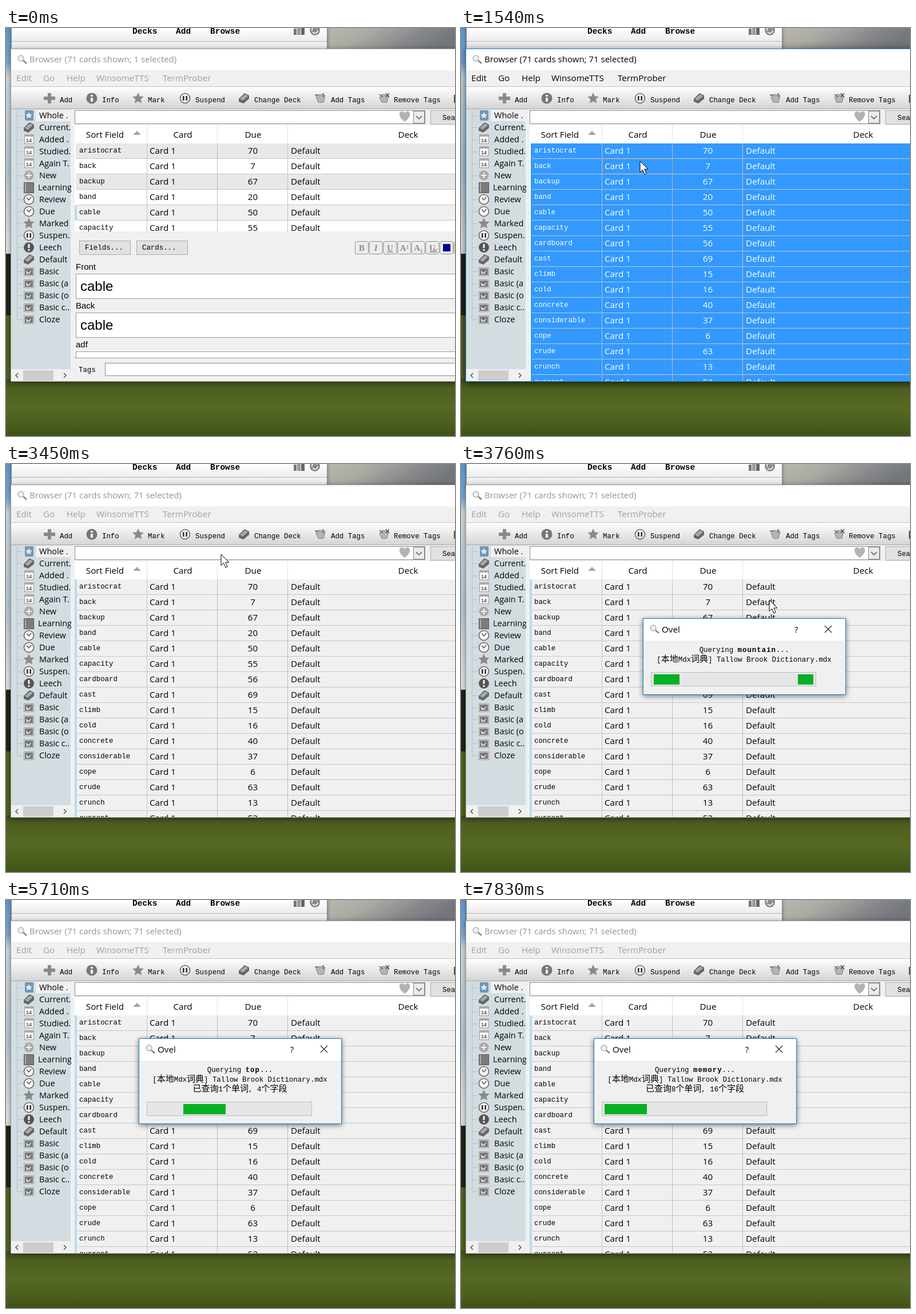
An HTML page for the animation above (8 s loop, 785 by 714 pixels).

```html
<!DOCTYPE html>
<html lang="en">
<head>
<meta charset="utf-8">
<title>Card browser</title>
<style>
html, body { margin: 0; width: 100%; height: 100%; overflow: hidden; background: #4d5f20; }
#stage { display: block; width: 785px; height: 714px; }
text { white-space: pre; fill: #000; }
.ui { font: 15.2px "Open Sans", "Noto Sans", sans-serif; }
.side { font: 14.5px "Open Sans", "Noto Sans", sans-serif; }
.title { font: 15px "Open Sans", "Noto Sans", sans-serif; }
.mono { font: 12.4px "Liberation Mono", "DejaVu Sans Mono", monospace; }
.head { font: bold 14.5px "Liberation Mono", "DejaVu Sans Mono", monospace; }
.label { font: 15px "Liberation Sans", sans-serif; }
.big { font: 24px "Liberation Sans", sans-serif; }
.fmt { font: bold 15px "Liberation Serif", serif; fill: #8b8b8b; text-anchor: middle; }
.date { font: bold 9px "Liberation Sans", sans-serif; fill: #555; text-anchor: middle; }
.cjk { font: 15px "Noto Sans CJK SC", "Noto Sans CJK", sans-serif; }
.word { font-weight: bold; letter-spacing: 1px; }
.mid { text-anchor: middle; }
.ico { fill: #8a8a8a; }
.pale { fill: #f4f4f4; }
.line { fill: none; stroke: #555; stroke-width: 1.5; }

.frame { fill: #f0f0f0; stroke: #9a9a9a; filter: drop-shadow(0 1px 4px #0006); }
.title { fill: #949494; }
.menu text { fill: #9aa39e; }
[data-active] .frame { stroke: #2684cf; filter: drop-shadow(0 2px 7px #0009); }
[data-active] .title { fill: #000; }
[data-menu] .menu text { fill: #000; }

.row > rect { fill: #fff; }
.row.even > rect { fill: #e8e8e8; }
.row .strip, .focus { visibility: hidden; }
.row .strip { fill: #b9dcf3; }
[data-mode=idle] .r4 > rect, [data-mode=dim] .row > rect { fill: #f0f0f0; }
[data-mode=idle] .r4 .strip, [data-mode=dim] .row .strip { fill: #b9dcf3; visibility: visible; }
[data-mode=one] .r1 > rect, [data-mode=all] .row > rect { fill: #39f; }
[data-mode=one] .r1 text, [data-mode=all] .row text { fill: #fff; }
[data-mode=one] .focus, [data-mode=all] .focus { visibility: visible; }
.focus { fill: none; stroke: #c98f4e; stroke-dasharray: 1 1; }
</style>
</head>
<body>
<svg id="stage" viewBox="0 0 785 714"></svg>
<script>
const LOOP = 8000, TICK = 75;

const rect = (x, y, w, h, fill, more = '') =>
  `<rect x="${x}" y="${y}" width="${w}" height="${h}" fill="${fill}" ${more}/>`;
const box = (x, y, w, h, fill, stroke, more = '') =>
  rect(x + .5, y + .5, w - 1, h - 1, fill, `stroke="${stroke}" ${more}`);
const text = (x, y, s, cls, more = '') => `<text x="${x}" y="${y}" class="${cls}" ${more}>${s}</text>`;
const path = (d, more = 'class="ico"') => `<path d="${d}" ${more}/>`;
const at = (x, y, s) => `<g transform="translate(${x} ${y})">${s}</g>`;
const pane = (x, y, w, h, s) => `<svg x="${x}" y="${y}" width="${w}" height="${h}" overflow="hidden">${s}</svg>`;
const disc = (r, fill = '#8a8a8a') => `<circle r="${r}" fill="${fill}"/>`;
const ring = `<circle r="8.5" fill="#f5f5f5" stroke="#666" stroke-width="1.6"/>`;
const gradient = (id, stops, dir = 'x2="0" y2="1"') => `<linearGradient id="${id}" ${dir}>` +
  stops.map(([o, c]) => `<stop offset="${o}" stop-color="${c}"/>`).join('') + '</linearGradient>';

// Icons are centred on 0,0.
const icons = {
  plus: path('M-3-9h6v6h7v6h-7v6h-6v-6h-7v-6h7z'),
  info: disc(9.5, '#777') + path('M-2-6h4v3h-4zM-2-1h4v7h-4z', 'class="pale"'),
  star: path('M0-10 2.9-3.6 9.8-2.9 4.7 1.8 6.1 8.6 0 5.2-6.1 8.6-4.7 1.8-9.8-2.9-2.9-3.6z'),
  pause: ring + path('M-4-4h2.6v8H-4zM1.4-4H4v8H1.4z', 'fill="#333"'),
  deck: path('M-9 1 1-9 9-5 9 1-1 9-9 6z', 'fill="#666"') + path('M-7 1 2-7 7-4-2 4z', 'fill="#aaa"'),
  tag: path('M-8-2-3-7 8-5 5 7-4 7z', 'fill="#b5b5b5" stroke="#777"') + path('M-10-7h7v3h-7zM3-9h3v7H3z'),
  untag: path('M-8-2-3-7 8-5 5 7-4 7z', 'fill="#b5b5b5" stroke="#777"') + path('M-8-7-2-2M3-9l6 7M9-9 3-2', 'class="line"'),
  whole: rect(-7, -9, 15, 18, '#7295b3', 'rx="2"') + path('M0-6 2-2 6-2 3 1 4 5 0 3-4 5-3 1-6-2-2-2z', 'fill="#dce9f3"'),
  date: box(-8, -9, 17, 17, '#fafafa', '#999') + rect(-8, -9, 17, 4, '#aaa') + text(0, 5, '14', 'date'),
  add: disc(8.5, '#aaa') + path('M-1-5h2v4h4v2H1v4h-2V1h-4v-2h4z', 'class="pale"'),
  book: box(-9, -9, 18, 19, '#7c7c7c', '#555') + rect(-7, -8, 2, 17, '#aaa'),
  clock: ring + path('M-4-3 0 1 4-4', 'class="line"'),
  alert: disc(9, '#555') + path('M-1.5-6h3v7h-3zM-1.5 3h3v3h-3z', 'class="pale"'),
  note: box(-9, -7, 18, 15, '#d8d8d8', '#999') + rect(-7, -5, 14, 11, '#777') + path('M-5-2-1 3 5-3 1 4-4 4z', 'class="pale"'),
  lens: `<circle cx="-2" cy="-2" r="5" fill="#e8f1f5" stroke="#aab3b8" stroke-width="1.5"/>` +
    path('M2 2 8 7', 'stroke="#a77c49" stroke-width="2.5"'),
};
const icon = (name, x, y) => at(x, y, icons[name]);

const backdrop = `<defs>` +
  gradient('sky', [[0, '#5d93c8'], [.12, '#78a7d2'], [.17, '#cbd6dc'], [.5, '#b6c6d3'], [.75, '#dde0df'], [1, '#c4cdd2']]) +
  gradient('cloud', [[0, '#b9b8b0'], [.35, '#aaa9a2'], [.75, '#84868a'], [1, '#73767b']], 'x2="1" y2=".3"') +
  gradient('grass', [[0, '#39481a'], [.15, '#4d5f20'], [.5, '#556922'], [.8, '#4b5e1d'], [1, '#3f5218']]) +
  gradient('bar', [[0, '#fff'], [1, '#d4d4d4']]) +
  gradient('top', [[0, '#fff'], [1, '#ececec']]) + `</defs>` +
  rect(0, 0, 785, 500, 'url(#sky)') + rect(562, 0, 223, 40, 'url(#cloud)') +
  rect(0, 395, 10, 110, '#1d2516') + rect(0, 503, 785, 117, '#4d6220') + rect(0, 615, 785, 99, 'url(#grass)');

const deckWindow = box(9, -5, 553, 50, '#f0f0f0', '#8c8c8c', 'style="filter:drop-shadow(0 0 3px #0006)"') +
  rect(10, 0, 551, 23, 'url(#top)') + rect(10, 23, 551, 1, '#b5b5b5') +
  text(221, 10, 'Decks', 'head') + text(297, 10, 'Add', 'head') + text(357, 10, 'Browse', 'head') +
  rect(503, 1, 5, 11, '#777') + rect(509, -1, 6, 13, '#999') + rect(516, -2, 6, 14, '#666') +
  at(540, 4, disc(9, '#8a8a8a') + path('M-5 1a5 5 0 0 1 9-4M5 0a5 5 0 0 1-9 3', 'class="line" style="stroke:#fff"'));

const menus = [['Edit', 18], ['Go', 65], ['Help', 106], ['WinsomeTTS', 158], ['TermProber', 274]];
const tools = [
  ['Add', 94, 'plus', 76], ['Info', 168, 'info', 150], ['Mark', 248, 'star', 231], ['Suspend', 331, 'pause', 313],
  ['Change Deck', 434, 'deck', 416], ['Add Tags', 568, 'tag', 550], ['Remove Tags', 678, 'untag', 661],
];
const side = [
  ['Whole .', 'whole'], ['Current.', 'deck'], ['Added .', 'date'], ['Studied.', 'date'], ['Again T.', 'date'],
  ['New', 'add'], ['Learning', 'book'], ['Review', 'clock'], ['Due', 'clock'], ['Marked', 'star'], ['Suspen.', 'pause'],
  ['Leech', 'alert'], ['Default', 'deck'], ['Basic', 'note'], ['Basic (a', 'note'], ['Basic (o', 'note'],
  ['Basic c..', 'note'], ['Cloze', 'note'],
];
const cards = [
  ['aristocrat', 70], ['back', 7], ['backup', 67], ['band', 20], ['cable', 50], ['capacity', 55], ['cardboard', 56],
  ['cast', 69], ['climb', 15], ['cold', 16], ['concrete', 40], ['considerable', 37], ['cope', 6], ['crude', 63],
  ['crunch', 13], ['current', 53],
];

const sidebar = rect(9, 142, 104, 455, '#d3dde1') + rect(52, 143, 61, 20, '#f0f0f0') +
  path('M19.5 145V510' + side.map((_, i) => `M20 ${153.5 + 21 * i}h9`).join(''),
    'fill="none" stroke="#9aa4a8" stroke-dasharray="1 1"') +
  pane(0, 0, 114, 597, side.map(([s, k], i) =>
    icon(k, 40, 153 + 21 * i) + text(k === 'book' ? 56 : 58, 158 + 21 * i, s, 'side')).join('')) +
  rect(9, 597, 104, 21, '#f0f0f0') + rect(30, 599, 53, 18, '#cdcdcd') +
  path('M21 604l-4 4 4 4M101 604l4 4-4 4', 'class="line"');

const search = box(120, 144, 613, 24, '#fff', '#8a8a8a') + box(712, 145, 20, 22, '#eaeaea', '#8a8a8a') +
  path('M717 154l5 5 5-5', 'class="line"') +
  path('M697 164C686 156 686 147 692 146q4 0 5 3 1-3 5-3c7 1 6 10-5 18z', 'fill="#b3b3b3"') +
  box(742, 144, 60, 25, '#e1e1e1', '#adadad') + text(763, 161, 'Search', 'mono');

const heads = [['Sort Field', 173], ['Card', 309], ['Due', 432], ['Deck', 703]];
const row = ([word, due], i) => {
  const y = 202 + 27 * i;
  return `<g class="row r${i} ${i % 2 ? '' : 'even'}">` + rect(122, y, 663, 27, '#fff') +
    rect(120, y, 4, 27, '', 'class="strip"') +
    rect(124, y + 26, 661, 1, '#c6c6c6', 'style="fill:#c6c6c6"') +
    text(128, y + 16, word, 'mono') + text(251, y + 18, 'Card 1', 'ui') +
    text(431.5, y + 18, due, 'ui mid') + text(498, y + 18, 'Default', 'ui') + '</g>';
};
const table = pane(0, 0, 785, 618, rect(120, 170, 665, 448, '#fff') +
  heads.map(([s, x]) => text(x, 192, s, 'ui mid')).join('') + path('M222 187l7-7 7 7z', 'fill="#a5a5a5"') +
  cards.map(row).join('') +
  [247, 370, 493].map(x => rect(x - 1, 170, 1, 32, '#e2e2e2') + rect(x - 1, 202, 1, 416, '#c0c0c0')).join('') +
  `<rect class="focus" x="248.5" y="229.5" width="121" height="25"/>`);

const button = (x, s) => box(x, 372, 90, 25, '#e1e1e1', '#adadad') + text(x + 10, 388, s, 'mono');
const field = (x, y, h) => box(x, y, 700, h, '#fff', '#999');
const format = ['B', '<tspan font-style="italic">I</tspan>', '<tspan text-decoration="underline">U</tspan>',
  'A²', 'A₂', '<tspan text-decoration="underline">U</tspan>', ''];
const editor = `<g id="editor">` + rect(120, 356, 665, 262, '#f0f0f0') +
  button(128, 'Fields...') + button(228, 'Cards...') +
  format.map((s, i) => box(610 + 24.7 * i, 373, 24, 23, '#ededed', '#8f8f8f', 'rx="3"') +
    text(622 + 24.7 * i, 390, s, 'fmt')).join('') +
  path('M747 386l7 7M754 386l-7 7', 'class="line" style="stroke:#999"') + rect(764, 378, 13, 13, '#00008b') +
  box(783, 373, 24, 23, '#ededed', '#8f8f8f', 'rx="3"') +
  pane(0, 0, 785, 577, `<g id="plain">` + text(122, 423, 'Front', 'label') + field(122, 430, 44) + text(130, 460, 'cable', 'big') +
    text(122, 491, 'Back', 'label') + field(122, 498, 44) + text(130, 528, 'cable', 'big') +
    text(122, 559, 'adf', 'label') + field(122, 566, 44) + `</g><g id="rich">` +
    text(128, 428, 'Front', 'mono') + field(128, 435, 44) + text(136, 465, 'back', 'big') +
    text(128, 494, 'Back', 'mono') + field(128, 502, 90) + text(136, 535, 'back', 'big', 'style="font-weight:bold"') +
    text(191, 526, '1', 'big', 'style="font-size:18px"') + text(210, 535, '/bak/', 'big') +
    text(150, 566, 'noun', 'big', 'style="font-size:23px;fill:#228b22"') + '</g>') +
  rect(120, 577, 665, 1, '#a0a0a0') + text(127, 602, 'Tags', 'mono') + box(173, 586, 700, 23, '#fff', '#8a8a8a') + '</g>';

const browser = `<rect class="frame" x="8.5" y="36.5" width="800" height="582"/>` +
  rect(9, 37, 776, 37, '#fff') + icon('lens', 28, 55) + text(41, 60, '', 'title', 'id="title"') +
  `<g class="menu">${menus.map(([s, x]) => text(x, 93, s, 'ui')).join('')}</g>` +
  rect(9, 102, 776, 40, 'url(#bar)') + rect(9, 102, 776, 1, '#c4c4c4') + rect(9, 141, 776, 1, '#a8a8a8') +
  tools.map(([s, x, k, ix]) => icon(k, ix, 123) + text(x, 130, s, 'mono tool')).join('') +
  rect(783, 117, 2, 14, '#555') + sidebar + search + table + editor;

const popup = `<g id="popup">` + box(262, 102, 233, 59, '#f2f2f2', '#b5b5b5', 'style="filter:drop-shadow(2px 2px 1px #0005)"') +
  rect(264, 105, 229, 26, '#90c8f6', 'id="hover"') + text(292, 123, 'Options', 'ui') +
  text(292, 149, 'Query Selected', 'ui') + text(435, 149, 'Ctrl+Q', 'ui') + '</g>';

const dialog = `<g id="dialog"><rect id="sheet" x=".5" y=".5" width="354" height="149" fill="#f0f0f0" stroke="#1a7fc9"
  style="filter:drop-shadow(0 2px 5px #0008)"/>` + rect(1, 1, 353, 38, '#fff') + icon('lens', 20, 19) +
  text(33, 25, 'Ovel', 'ui') + text(268, 25, '?', 'ui mid') +
  path('M318 13l12 12M330 13l-12 12', 'class="line" style="stroke:#222;stroke-width:1.2"') +
  [59, 76, 93].map(y => text(177, y, '', 'mono mid says')).join('') +
  `<g id="meter">` + box(14, 111, 289, 25, '#e6e6e6', '#bcbcbc') +
  pane(19, 115, 279, 18, rect(0, 0, 74, 18, '#06b025', 'class="chunk"').repeat(2)) + '</g></g>';

const ink = 'fill="#fff" stroke="#000" stroke-linejoin="round"';
const pointer = `<g id="pointer">` + path('M0 0V19.5L4.5 15.2 8 23.2 11.2 21.8 7.8 14H14z', ink + ' id="arrow"') +
  path('M0 1q2-2 4 0v8q3-1 4 1 3-1 4 1 2-1 2 2v6q0 3-3 5v3H0v-3l-6-8q-2-4 1-4l5 4z', ink + ' id="hand"') + '</g>';

const $ = id => document.getElementById(id);
const stage = $('stage');
stage.innerHTML = backdrop + deckWindow + browser + popup + dialog + pointer;
const toolTexts = [...stage.querySelectorAll('.tool')];
const says = [...stage.querySelectorAll('.says')];
const chunks = [...stage.querySelectorAll('.chunk')];

const pointerPath = [
  [70, 400, 716], [300, 370, 520], [525, 320, 260], [675, 313, 233], [1800, 313, 233], [2025, 272, 135],
  [2250, 315, 124], [2400, 318, 112], [2600, 322, 87], [2850, 325, 112], [3225, 335, 138], [3375, 335, 138],
  [3750, 539, 238], [4125, 492, 297], [4340, 492, 297],
];
const dialogPath = [[4340, 318, 270], [4650, 275, 256], [4950, 237, 243], [5100, 232, 242]];

// Busy meter: [time, step]; each step moves the chunk by STEP pixels, wrapping after SPAN.
const STEP = 14.8, SPAN = 281;
const meter = [
  [3520, 1], [3600, 8], [3680, 13], [3760, 17], [3860, 2], [3950, 3], [4030, 4], [4180, 5], [4420, 6], [4570, 7],
  [4730, 8], [4880, 9], [5000, 10], [5120, 11], [5200, 13], [5380, 14], [5450, 12], [5620, 0], [5710, 4],
  [5850, 14], [5920, 17], [6090, 2], [6160, 4], [6410, 5], [6490, 6], [6570, 7], [6800, 8], [6870, 9], [6950, 10],
  [7120, 11], [7210, 12], [7360, 4], [7440, 2], [7600, 12], [7690, 13], [7830, 0],
];
const local = '[本地Mdx词典] Tallow Brook Dictionary.mdx';
const wide = '[本地Mdx词典] Harrow Fielding Dictionary.mdx';
const online = '[云岚袖珍词典] 例句与用法';
const labels = [
  [3520, 'mountain', local], [4340, 'top', local, 1, 4], [5850, 'top', local, 2, 5], [6090, 'scold', wide, 3, 7],
  [6490, 'scold', online, 4, 9], [7360, 'tissue', wide, 5, 12], [7600, 'sole', wide, 7, 14], [7830, 'memory', local, 8, 16],
];

const last = (list, t) => list.filter(k => k[0] <= t).pop() || list[0];
function glide(keys, t) {
  t = Math.floor(t / TICK) * TICK;
  const i = keys.findIndex(k => k[0] > t);
  if (i < 0) return keys[keys.length - 1].slice(1);
  if (i === 0) return keys[0].slice(1);
  const [a, b] = [keys[i - 1], keys[i]], f = (t - a[0]) / (b[0] - a[0]);
  return [1, 2].map(n => Math.round(a[n] + (b[n] - a[n]) * f));
}
const show = (node, on) => node.setAttribute('visibility', on ? 'visible' : 'hidden');
const move = (node, [x, y]) => node.setAttribute('transform', `translate(${x} ${y})`);
const cjk = s => s.replace(/[\u4e00-\u9fff]+/g, m => `<tspan class="cjk">${m}</tspan>`);

let shown;
function setLabel(label) {
  if (label === shown) return;
  shown = label;
  const [, word, source, words, fields] = label, short = !words;
  says[0].innerHTML = `Querying <tspan class="word">${word}</tspan>...`;
  says[1].innerHTML = cjk(source);
  says[2].innerHTML = short ? '' : cjk(`已查询${words}个单词, ${fields}个字段`);
  $('sheet').setAttribute('height', short ? 133 : 149);
  move($('meter'), [0, short ? -17 : 0]);
}

function draw(t) {
  const active = t >= 680 && t < 3450, open = t >= 2600 && t < 3450;
  stage.dataset.mode = t < 830 ? 'idle' : t < 1450 ? 'one' : t < 3450 ? 'all' : 'dim';
  stage.toggleAttribute('data-active', active);
  stage.toggleAttribute('data-menu', active && t >= 830);
  $('title').textContent = `Browser (71 cards shown; ${t < 1450 ? 1 : 71} selected)`;
  show($('editor'), t < 1540);
  show($('plain'), t < 830);
  show($('rich'), t >= 830 && t < 1540);

  const [dx, dy] = glide(dialogPath, t);
  const [x, y] = t < 4340 ? glide(pointerPath, t) : [dx + 174, dy + 27];
  const hot = active && !open && y > 104 && y < 140 ? tools.findIndex(([s, tx, , ix]) => x > ix - 12 && x < tx + s.length * 7.45) : -1;
  toolTexts.forEach((n, i) => n.setAttribute('text-decoration', i === hot ? 'underline' : 'none'));
  move($('pointer'), [x, y]);
  show($('arrow'), hot < 0 && t >= 70 && t < 5380);
  show($('hand'), hot >= 0);

  show($('popup'), open);
  show($('hover'), open && y > 104);
  $('hover').setAttribute('y', y > 130 ? 131 : 105);

  $('dialog').style.display = t >= 3520 ? '' : 'none';
  move($('dialog'), [dx, dy]);
  setLabel(last(labels, t));
  const p = Math.round(last(meter, t)[1] * STEP);
  chunks[0].setAttribute('x', p);
  chunks[1].setAttribute('x', p - SPAN);
}

function frame() {
  draw(performance.now() % LOOP);
  requestAnimationFrame(frame);
}
frame();
</script>
</body>
</html>
```
